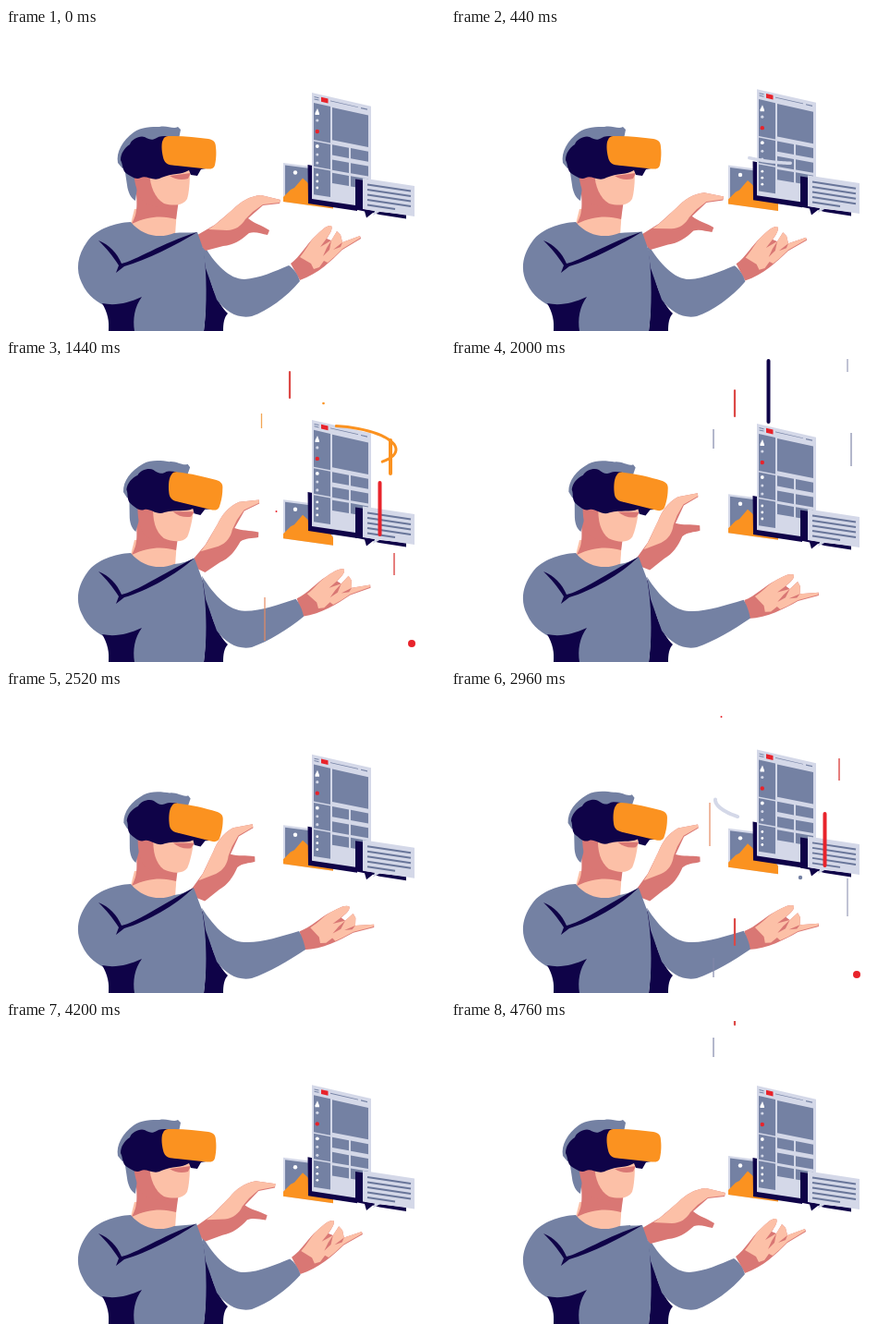
These frames come from a looping animation (475 px wide and 328 px high, 4800 ms). An HTML page:

```html
<!DOCTYPE html>
<html lang="en">
<head>
<meta charset="utf-8">
<title>Virtual reality</title>
<style>
html, body { margin: 0; width: 100%; height: 100%; overflow: hidden; background: #fff; }
svg { display: block; width: 100%; height: 100%; }
.slate { fill: #7481a3; }
.navy { fill: #0f0348; }
.skin { fill: #fcc0a7; }
.rose { fill: #d97774; }
.orange { fill: #fb9220; }
.red { fill: #e8232b; }
.pale { fill: #d4d8e8; }
.white { fill: #fff; }
</style>
</head>
<body>
<svg viewBox="0 0 475 328">
  <g id="photo">
    <path class="pale" d="M300 146L354 153V195.500L300 188Z"/>
    <path class="slate" d="M302 148.500L352 155V193L302 186Z"/>
    <circle class="white" cx="313" cy="156.500" r="2.200"/>
    <path class="orange" d="M300 183L308 175L312 173L321 162.500L326 167L331 174L338 178L344 173L354 187V195.500L300 188Z"/>
  </g>
  <g id="panel">
    <path class="navy" d="M326.500 148L332 149V184L380 190V198L327 190Z"/>
    <g id="page"></g>
  </g>
  <g id="chat">
    <path class="navy" d="M378 163.500L388 165V196L405 199L433 202V206.500L404 202L397 200L390 205.500L388 198.500L378 196.500Z"/>
    <path class="pale" d="M386 162.500L442 171V204L405 198.500L397 203L399 198L386 196Z"/>
    <g id="note" stroke="#69769a" stroke-width="2"></g>
  </g>

  <path class="navy" d="M211 236C216 262 218 300 214 328H235C235 320 236 313 240 309C228 298 220 275 215 245Z"/>
  <g id="palm">
    <path class="rose" d="M308 255C318 248 326 233 334 226C341 219 347 213 352 214C354 218 350 223 347 228L352 230L358 220L362 224L364 232L383 225L384 228L364 240C352 252 338 266 318 273Z"/>
    <path class="skin" d="M318 248C325 240 328 232 334 226C341 219 347 213 352 214C354 218 350 223 346 229L340 237L352 230L358 220L362 224L364 232L383 225L383 227.500L364 239L355 248L348 254L344 252L339 259L333 261L330 255Z"/>
    <path class="rose" d="M352 230L350 240L343 247L347 238ZM364 232L362 237L354 240Z"/>
  </g>
  <path class="slate" id="sleeve"/>
  <g id="hand">
    <path class="rose" d="M202 227L226 213L246 196C254 188 263 182 276 181L297 186L296 190L278 192L262 206C269 212 276 213 285 219L283 224C276 223 270 220 263 222C254 230 246 235 235 236L216 241Z"/>
    <path class="skin" d="M219 218C232 210 238 202 246 196C254 188 263 182 276 181L297 186L296 189L278 191L267 199L259 207C255 214 248 219 239 219Z"/>
  </g>
  <path class="skin" d="M139 196L185 196L183 224C168 232 148 228 135 212Z"/>
  <path class="rose" d="M140 168L187 186L184 207C170 203 155 203 136 212C143 200 142 190 140 168Z"/>
  <path class="slate" id="torso"/>
  <path class="navy" d="M104 298C118 301 132 298 147 291C139 302 137 315 139 328H111C112 318 110 308 104 298Z"/>
  <path class="navy" id="crease"/>

  <g id="head">
    <path class="slate" d="M128 150L131 170C132 178 135 184 140 187L144 158Z"/>
    <path class="slate" d="M121 146C119 134 126 122 138 113C146 107 158 107 166 107C174 105 181 110 186 107L189 110L187 120L140 140L126 152Z"/>
    <path class="rose" d="M138 155L160 156L182 192C172 197 160 194 150 190C143 182 139 170 138 155Z"/>
    <path class="skin" d="M155 156C156 172 161 184 171 190C182 193 192 192 196 185C198 178 199 168 199 152L172 150Z"/>
    <path class="rose" d="M177 160L200 157L197 163C190 165 183 164 177 160Z"/>
    <path class="navy" d="M124 143C124 136 128 130 134 126C136 120 145 116 150 118C156 121 158 122 163 119C166 117 170 117 175 117L180 148L222 151L211 153L207 160L200 159L198 154C190 159 180 157 168 162C160 167 152 159 146 162C140 165 135 160 131 158C125 154 127 148 124 143Z"/>
    <path class="orange" d="M176 117C190 116.500 206 118 219 120C225 121 227 124 227 129C228 137 227 144 226 148.500C225 152 222 153 217 152.500L180 148.500C174 148 171 145 170 140C168 132 168 124 170 121C171 118 173 117 176 117Z"/>
  </g>
  <g id="sparks" fill="none"></g>
</svg>
<script>
const LOOP = 4800, STEP = 40;
const NAVY = '#0f0348', RED = '#e8232b', ORANGE = '#fb9220', PALE = '#d4d8e8', SLATE = '#7481a3';
const HAZE = '#8187a9', CORAL = '#dc4846';
const $ = id => document.getElementById(id);
const add = (parent, tag, attrs) => {
  const el = document.createElementNS('http://www.w3.org/2000/svg', tag);
  for (const k in attrs) el.setAttribute(k, attrs[k]);
  return parent.appendChild(el);
};

// Static screen details, drawn along the tilted plane of the page
const tilt = (x, y) => `${x} ${(y + (x - 331) * (0.23 - 0.08 * (y - 70) / 115)).toFixed(1)}`;
const tile = (cls, x, y, w, h) => add($('page'), 'path', {
  class: cls,
  d: `M${tilt(x, y)}L${tilt(x + w, y)}L${tilt(x + w, y + h)}L${tilt(x, y + h)}Z`
});
const icon = (cls, y, r) => add($('page'), 'circle', { class: cls, cx: 336.8, cy: y, r });
tile('pale', 331, 70, 64, 115);
tile('slate', 333.5, 73.5, 5, 1);
tile('slate', 333.5, 75.8, 5, 1);
tile('red', 341, 72.5, 7.5, 5);
tile('slate', 351, 74, 30, 0.8);
tile('slate', 384, 74, 7, 1.2);
tile('slate', 333, 80.5, 18, 40);
tile('slate', 333, 122, 18, 27.5);
tile('slate', 333, 151, 18, 29);
tile('slate', 353, 81, 39, 36);
for (const y of [122, 138.5, 153]) {
  tile('slate', 353, y, 18, 11.5);
  tile('slate', 373, y, 19, 11.5);
}
add($('page'), 'path', { class: 'white', d: 'M334.5 92L337 87L339 92.5V94H334.5Z' });
icon('pale', 100, 1.6);
icon('red', 112, 2.2);
icon('white', 128, 1.9);
icon('pale', 137, 1.5);
icon('pale', 146, 1.6);
[159, 166, 173].forEach(y => icon('white', y, 1.4));
for (let i = 0; i < 5; i++) {
  const y = 169.5 + i * 5.5, w = i < 4 ? 47 : 30;
  add($('note'), 'line', { x1: 391, y1: y, x2: 391 + w, y2: y + w * 0.15 });
}

// Streaks: [x, top, bottom, width, colour]; dots: [x, y, radius, colour].
// Each pass is [time, shift] while the group rushes upwards.
const groups = [
  { items: [[416, 68, 104, 4, ORANGE], [420, 190, 214, 1.4, CORAL], [280, 238, 285, 1.2, '#e58a62'],
            [343.5, 28, 1.3, ORANGE], [292.5, 145, 1, RED]],
    passes: [[800, 0], [1440, 20], [2960, -116]] },
  { items: [[343.5, 44, 110, 4, NAVY], [433, 122, 158, 1.2, HAZE]], passes: [[800, 0], [2000, -42]] },
  { items: [[307, 34, 62, 2.2, CORAL]], passes: [[1440, -20], [2000, 0], [2960, 214], [4760, -58]] },
  { items: [[284, 76, 97, 1.2, HAZE]], passes: [[2000, 0], [2960, 214], [4760, -58]] },
  { items: [[429, 204, 245, 1, HAZE]], passes: [[2000, -231], [2960, 0]] },
  { items: [[404.5, 134, 190, 4, RED], [439, 308, 4, RED]], passes: [[1440, 0], [2960, 0]] },
  { items: [[276.5, 59, 75, 1.3, '#f2a655']], passes: [[1440, 0], [3680, 214]] },
  { items: [[303.5, 212, 233, 1.2, HAZE]], passes: [[3680, 0]] },
  { items: [[367.5, 300, 2.8, RED]], passes: [[800, 0], [3680, -136]] },
  { items: [[378, 320, 2.2, SLATE]], passes: [[800, 0], [2960, -117]] }
];
const sparks = groups.flatMap(g => g.passes.flatMap(([time, shift]) => g.items.map(it => {
  const el = it.length === 5
    ? add($('sparks'), 'line', { x1: it[0], x2: it[0], y1: it[1], y2: it[2], stroke: it[4],
        'stroke-width': it[3], 'stroke-linecap': it[3] > 2 ? 'round' : 'butt' })
    : add($('sparks'), 'circle', { cx: it[0], cy: it[1], r: it[2], fill: it[3] });
  return { el, time, shift };
})));

// Swooshes: trimmed pieces of tilted ellipses, angles in degrees
const rings = {
  high: { cx: 356, cy: 94.5, rx: 66, ry: 22 },
  wide: { cx: 362, cy: 123, rx: 76, ry: 23 },
  back: { cx: 357, cy: 103, rx: 77, ry: 22 },
  low: { cx: 360, cy: 140, rx: 42, ry: 22 }
};
const swooshes = [
  [800, 'back', 193, 232, 4, RED], [800, 'wide', 195, 300, 3.5, PALE], [800, 'low', 205, 216, 2, ORANGE],
  [1440, 'high', -90, 38, 3, ORANGE], [2960, 'wide', 132, 180, 4, PALE],
  [3680, 'high', 158, 282, 3.2, ORANGE], [3680, 'low', -80, -30, 2, ORANGE], [3680, 'wide', -18, 52, 3.2, PALE]
].map(([time, ring, from, to, width, stroke]) => ({
  time, ring: rings[ring], from, to,
  el: add($('sparks'), 'path', { stroke, 'stroke-width': width, 'stroke-linecap': 'round' })
}));
const onRing = (r, deg) => {
  const a = deg * Math.PI / 180, x = r.rx * Math.cos(a), y = r.ry * Math.sin(a);
  return `${(r.cx + x - y * 0.06).toFixed(2)} ${(r.cy + y + x * 0.06).toFixed(2)}`;
};
const swoosh = (s, t) => {
  const turn = (t - s.time) * 0.5;
  const a = Math.max(s.from + turn, s.from - 110), b = Math.min(s.to + turn, s.to + 110);
  if (b <= a) return '';
  let d = 'M' + onRing(s.ring, a);
  for (let i = 1; i <= 24; i++) d += 'L' + onRing(s.ring, a + (b - a) * i / 24);
  return d;
};

const ease = (t, a, b) => (1 - Math.cos(Math.PI * Math.min(1, Math.max(0, (t - a) / (b - a))))) / 2;
const swing = (t, a, b, c, d) => ease(t, a, b) - ease(t, c, d);
const blend = (from, to, k) => {
  const n = to.match(/[\d.]+/g);
  let i = 0;
  return from.replace(/[\d.]+/g, v => (+v + (n[i++] - v) * k).toFixed(2));
};

const shapes = {
  sleeve: [
    'M212 232C226 256 242 272 258 272C274 271 292 263 306 257C311 260 316 267 318 274C303 292 283 306 266 312C252 315 238 308 228 294L216 260Z',
    'M212 236C226 258 242 273 258 273C276 274 296 267 317 261C320 266 323 274 324 281C306 293 284 306 266 312C252 315 238 308 228 294L216 260Z'
  ],
  torso: [
    'M135 210C118 211 98 217 88 231C77 246 75 262 82 276C88 290 100 298 112 303L111 328H214C218 300 217 265 214 241L207 221C198 222 190 221 182 222C168 228 148 226 135 210Z',
    'M135 210C118 211 98 217 88 231C77 246 75 262 82 276C88 290 100 298 112 303L111 328H214C218 300 217 265 212 238L203 214C198 218 190 221 182 222C168 228 148 226 135 210Z'
  ],
  crease: [
    'M100 230C112 235 120 243 125 255C140 252 168 233 207 221C184 235 152 251 128 258L119 265L122 257C115 246 109 239 100 230Z',
    'M100 230C112 235 120 243 125 255C140 252 168 233 203 214C184 233 152 251 128 258L119 265L122 257C115 246 109 239 100 230Z'
  ]
};
const move = (id, value) => $(id).setAttribute('transform', value);
const morph = (id, k) => $(id).setAttribute('d', blend(...shapes[id], k));

function draw(t) {
  const hand = swing(t, 100, 2000, 2850, 4800);
  const palm = swing(t, 100, 2250, 2750, 4600);
  const head = swing(t, 500, 1600, 2700, 3900);
  const h = t % (LOOP / 2);
  const lift = swing(h, 0, 900, 900, 2000);
  move('head', `rotate(${8 * head} 140 190)`);
  move('hand', `translate(${-5 * hand} ${-10 * hand}) rotate(${-24 * hand} 212 230)`);
  move('palm', `translate(${7 * palm} ${7 * palm}) rotate(${16.5 * palm} 312 264)`);
  move('panel', `translate(0 ${-8 * lift})`);
  move('chat', `translate(0 ${-6 * lift})`);
  move('photo', `translate(0 ${8 * swing(h, 0, 1150, 1150, 2100)})`);
  morph('sleeve', palm);
  morph('torso', hand);
  morph('crease', hand);
  for (const s of sparks) s.el.setAttribute('transform', `translate(0 ${s.shift - (t - s.time)})`);
  for (const s of swooshes) s.el.setAttribute('d', swoosh(s, t));
}

const start = performance.now();
function tick() {
  const t = (performance.now() - start) % LOOP;
  draw(Math.floor(t / STEP) * STEP);
  requestAnimationFrame(tick);
}
draw(0);
requestAnimationFrame(tick);
</script>
</body>
</html>
```
